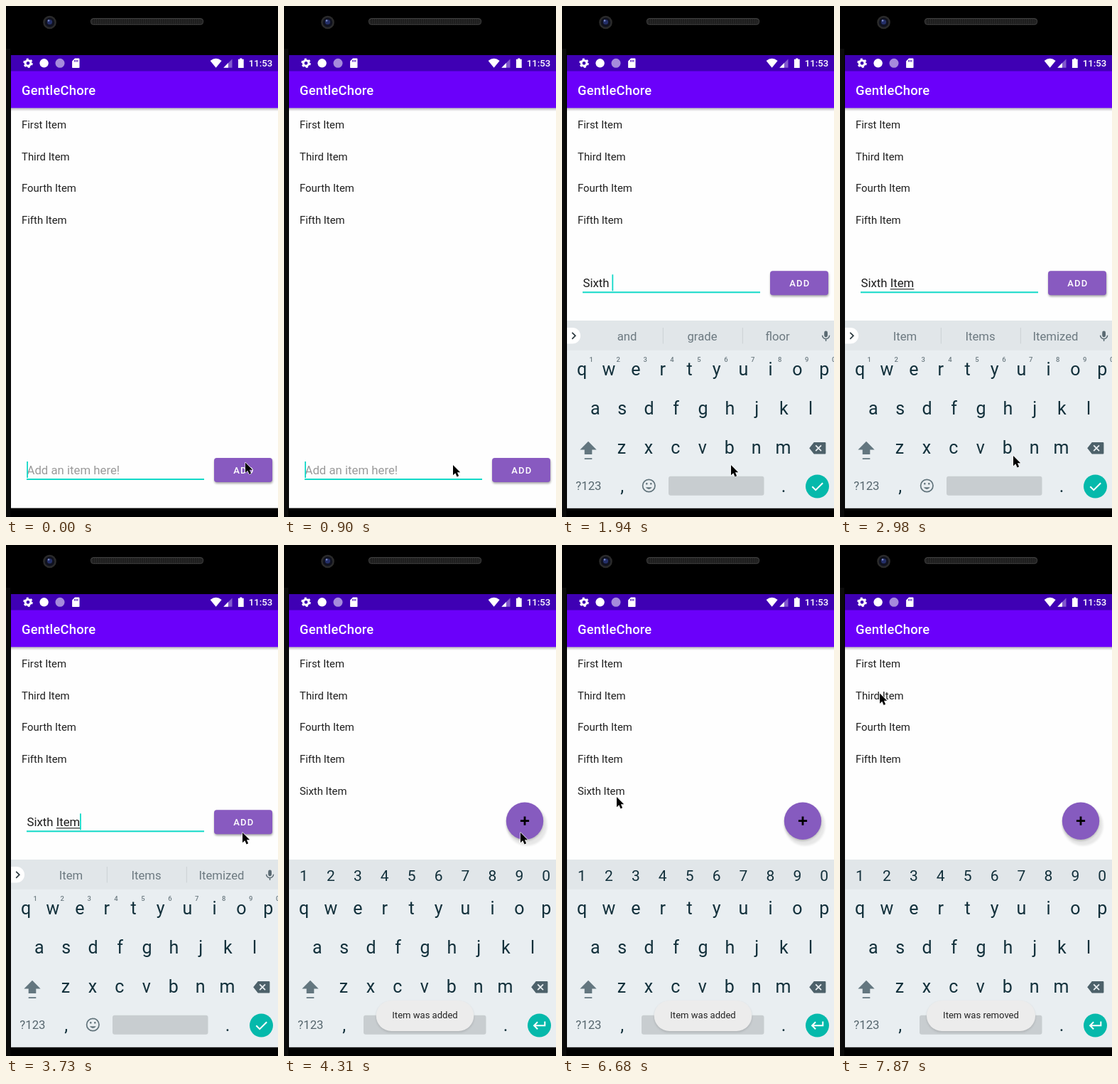
An HTML page for the animation above (8 s loop, 383 by 718 pixels).

```html
<!DOCTYPE html>
<html lang="en">
<head>
<meta charset="utf-8">
<title>Todo list</title>
<style>
  html, body { margin: 0; width: 100%; height: 100%; overflow: hidden; background: #000; }
  svg { display: block; width: 383px; height: 718px; font-family: Roboto, "Open Sans", sans-serif; }
  text { white-space: pre; }
  .mid { text-anchor: middle; }
  .item { font-size: 14.9px; fill: #1f1f1f; }
  .field { font-size: 16.75px; fill: #1c1c1c; }
  .hint { font-size: 16.75px; fill: #9a9a9a; }
  .key { font-size: 25px; fill: #12303b; }
  .num { font-size: 21px; fill: #12303b; }
  .sup { font-size: 9.5px; font-weight: 500; fill: #6d7b82; }
  .word { font-size: 16.7px; fill: #6c7980; }
  .toast { font-size: 13.05px; fill: #222; }
</style>
</head>
<body>
<svg viewBox="0 0 383 718">
  <defs>
    <pattern id="mesh" width="3" height="3" patternUnits="userSpaceOnUse">
      <rect width="3" height="3" fill="#1c1c1c"/><circle cx="1.5" cy="1.5" r=".8" fill="#383838"/>
    </pattern>
    <linearGradient id="barShade" x2="0" y2="1">
      <stop stop-color="#000" stop-opacity=".28"/><stop offset="1" stop-color="#000" stop-opacity="0"/>
    </linearGradient>
    <filter id="soft" x="-20%" y="-30%" width="140%" height="170%"><feGaussianBlur stdDeviation="1.4"/></filter>
  </defs>

  <!-- phone -->
  <rect width="383" height="718"/>
  <rect y="60" width="6" height="658" fill="#0b0b0b"/>
  <circle cx="61.5" cy="23" r="9.3" fill="#2b2b2b"/>
  <circle cx="61.5" cy="23" r="6.8" fill="#10121f"/>
  <circle cx="61.5" cy="22.5" r="3.6" fill="#242f68"/>
  <circle cx="60" cy="20.5" r="1.3" fill="#7f8dc8"/>
  <rect x="119.5" y="17.5" width="158" height="8.5" rx="3.5" fill="url(#mesh)" stroke="#444"/>

  <!-- screen -->
  <rect x="7" y="69" width="376" height="636.5" fill="#fefefe"/>
  <rect x="7" y="143" width="376" height="5" fill="url(#barShade)"/>
  <rect x="7" y="91" width="376" height="52.3" fill="#6b00fa"/>
  <rect x="7" y="69" width="376" height="22.5" fill="#3f00b4"/>
  <g fill="#fff">
    <circle cx="31" cy="80.3" r="3.9" fill="none" stroke="#fff" stroke-width="3"/>
    <circle cx="31" cy="80.3" r="5.7" fill="none" stroke="#fff" stroke-width="2.2" stroke-dasharray="2.9 3.07"/>
    <circle cx="53.6" cy="80.3" r="6.2"/>
    <circle cx="76" cy="80.3" r="6.5" fill="#a68bdc"/>
    <path d="M97 73.5h5.3a1.2 1.2 0 0 1 1.2 1.2v11.2a1.2 1.2 0 0 1-1.2 1.2h-8a1.2 1.2 0 0 1-1.2-1.2v-8.4z"/>
    <path d="M96.6 76v2.4m2.1-2.4v2.4m2.1-2.4v2.4" stroke="#3f00b4" stroke-width="1.1"/>
    <path d="M287.6 77q8-6.6 16 0l-8 9.8z"/>
    <path d="M306.3 86.7h12.2V74.4z" opacity=".35"/>
    <path d="M306.3 86.7h6.6v-6.6z"/>
    <path d="M329.3 73.4h3v1.4h2.4v12.1h-7.8V74.8h2.4z"/>
    <text x="341.7" y="85" font-size="13.2" font-weight="500">11:53</text>
    <text x="22" y="124.6" font-size="18.4" font-weight="500" letter-spacing=".2">GentleChore</text>
  </g>
  <g id="list"></g>

  <g id="form">
    <text id="hint" class="hint" x="29.5" y="658">Add an item here!</text>
    <text class="field" x="29.5" y="658"><tspan id="done"></tspan><tspan id="typing"></tspan></text>
    <rect id="under" y="660" height="1.1" fill="#1c1c1c"/>
    <rect x="29" y="664" width="250" height="2" fill="#12d9c8"/>
    <rect id="caret" y="640" width="1.8" height="23" fill="#12d9c8"/>
    <rect x="293.5" y="637" width="82" height="34" rx="4" fill="#000" opacity=".35" filter="url(#soft)"/>
    <rect x="293" y="635" width="82" height="34" rx="3.8" fill="#885ac0"/>
    <text class="mid" x="334.8" y="657" font-size="13" font-weight="500" letter-spacing="1.16" fill="#fff">ADD</text>
  </g>

  <g id="fab">
    <circle cx="342" cy="394" r="28.5" fill="#000" opacity=".09" filter="url(#soft)"/>
    <circle cx="339" cy="389.5" r="26.3" fill="#000" opacity=".2" filter="url(#soft)"/>
    <circle cx="339" cy="387.7" r="26.2" fill="#865bbf"/>
    <path d="M332.9 387.7h12.2m-6.1-6.1v12.2" stroke="#000" stroke-width="2.8"/>
  </g>

  <g id="board">
    <rect x="7" y="442" width="376" height="263.5" fill="#e9eef1"/>
    <rect x="7" y="442" width="376" height="41.7" fill="#e1e6e9"/>
    <g id="letters"></g>
    <g id="words">
      <path d="M7 452H14.7a11.3 11.3 0 0 1 0 22.6H7z" fill="#fff"/>
      <path d="M14.2 458.8l4.6 4.5-4.6 4.5" fill="none" stroke="#2c3a40" stroke-width="1.7"/>
      <path d="M142.3 452v22.5M254.3 452v22.5" stroke="#cbd1d4"/>
      <rect x="369.2" y="456.5" width="4.8" height="9" rx="2.4" fill="#5a6a72"/>
      <path d="M366.6 462.7a5 5 0 0 0 10 0M371.6 467.5v3.4" fill="none" stroke="#5a6a72" stroke-width="1.5"/>
      <g id="picks"></g>
      <g id="sups"></g>
      <g fill="none" stroke="#61737b" stroke-width="1.7">
        <circle cx="122.3" cy="674" r="8.7"/><path d="M117.8 676.3q4.5 5.6 9 0z" fill="#61737b" stroke="none"/>
        <path d="M119.3 670v2.6m6-2.6v2.6" stroke-width="2.2"/>
      </g>
    </g>
    <g id="nums"></g>
    <path d="M37 611.8l11.6 11.8h-6.3v6.4H31.7v-6.4h-6.3zM31.7 635.3h10.6v1.8H31.7z" fill="#63767f"/>
    <path d="M354.8 613h15.4a1.2 1.2 0 0 1 1.2 1.2v14a1.2 1.2 0 0 1-1.2 1.2h-15.4l-6.6-8.2z" fill="#4d616a"/>
    <path d="M357.2 617.3l7.8 7.8m0-7.8l-7.8 7.8" stroke="#e9eef1" stroke-width="1.8"/>
    <text class="mid" x="37.4" y="680" font-size="16.8" fill="#56666e">?123</text>
    <text class="mid key" x="84.8" y="683" font-size="23">,</text>
    <text class="mid key" x="312" y="683">.</text>
    <rect id="space" y="660.7" height="27" rx="3" fill="#c8cdd0"/>
    <circle cx="359.5" cy="675" r="16.5" fill="#05b9ab"/>
    <path id="enter" fill="none" stroke="#fff" stroke-width="2"/>
  </g>

  <g id="toast">
    <rect id="pillShade" y="641.5" height="43" rx="21" fill="#000" opacity=".12" filter="url(#soft)"/>
    <rect id="pill" y="640" height="43" rx="21.5" fill="#ececec"/>
    <text id="note" class="mid toast" x="198.5" y="665"></text>
  </g>

  <path id="mouse" d="M0 0V14.2L3.3 11.2 5.6 16.4 8.1 15.3 5.9 10.2H10.2Z" stroke="#fff" stroke-width="1.1" stroke-linejoin="round" paint-order="stroke"/>
</svg>

<script>
const $ = id => document.getElementById(id);
const LOOP = 8000, PITCH = 37.92;

const label = (cls, x, y, s) => `<text class="${cls}" x="${x}" y="${y}">${s}</text>`;
const row = (chars, cls, x, y) =>
  [...chars].map((c, i) => label('mid ' + cls, x + i * PITCH, y, c)).join('');

$('letters').innerHTML = row('qwertyuiop', 'key', 28, 519) +
  row('asdfghjkl', 'key', 46.8, 574) + row('zxcvbnm', 'key', 84, 629);
$('nums').innerHTML = row('1234567890', 'num', 28, 471.5);
$('sups').innerHTML = row('1234567890', 'sup', 41.3, 500);

const LIST = ['First', 'Third', 'Fourth', 'Fifth', 'Sixth'];
const MODES = {
  none: { board: 0, form: 0 },
  words: { board: 1, form: -262.7, space: [150, 134.5], enter: 'M352.3 675.3l4.9 4.9 10-10' },
  nums: { board: 1, space: [112, 172.5], enter: 'M367.3 669.5v5.7h-15m4.8-5l-5 5 5 5' }
};

// [ms, changes that last until overwritten]
const STEPS = [
  [0, { mode: 'none', at: [337, 641.5], caret: 1, done: '', typing: '', picks: [], count: 4, note: '', fade: 0, drop: 0 }],
  [150, { at: [296, 643] }],
  [300, { at: [252, 645] }],
  [450, { at: [238, 645], caret: 0 }],
  [900, { caret: 1 }],
  [1200, { mode: 'words', drop: 3, typing: 'Si', picks: ['Si', 'So', 'Since'] }],
  [1350, { drop: 0, typing: 'Six', picks: ['Six', 'Sixth', 'Sixty'] }],
  [1640, { typing: 'Sixt', picks: ['Sixt', 'Sixth', 'Sixty'] }],
  [1790, { typing: 'Sixth', picks: ['Sixth', 'Sixths', 'Sixty'] }],
  [1940, { done: 'Sixth ', typing: '', picks: ['and', 'grade', 'floor'] }],
  [2240, { typing: 'I', picks: ['I', 'I\'m', 'It'] }],
  [2390, { typing: 'Ite', picks: ['Ite', 'Item', 'Items'] }],
  [2530, { typing: 'Item', picks: ['Item', 'Items', 'Itemized'] }],
  [2980, { at: [244, 632], caret: 0 }],
  [3130, { at: [276, 560] }],
  [3280, { at: [320, 468] }],
  [3430, { at: [347, 412], caret: 1 }],
  [3580, { at: [338, 405] }],
  [3730, { at: [333, 404] }],
  [4020, { mode: 'nums', count: 5 }],
  [4170, { note: 'Item was added', fade: .5 }],
  [4310, { fade: 1 }],
  [4460, { at: [322, 406] }],
  [4600, { at: [276, 411] }],
  [4750, { at: [237, 414] }],
  [5490, { at: [101, 376] }],
  [5640, { at: [88, 364] }],
  [5790, { at: [80, 357] }],
  [5930, { at: [77, 355] }],
  [6680, { at: [77, 354] }],
  [7280, { count: 4, note: 'Item was removed' }],
  [7430, { at: [75, 333] }],
  [7580, { at: [67, 275] }],
  [7720, { at: [59, 222] }],
  [7870, { at: [56, 208.5] }]
];

const show = (id, on) => $(id).style.display = on ? '' : 'none';
const span = (id, x, w) => { $(id).setAttribute('x', x); $(id).setAttribute('width', w); };

function draw(s) {
  const m = MODES[s.mode], nums = s.mode === 'nums';
  $('list').innerHTML = LIST.slice(0, s.count)
    .map((n, i) => label('item', 22, 172 + i * 44.65, n + ' Item')).join('');

  show('form', !nums);
  show('fab', nums);
  show('board', m.board);
  show('words', !nums);
  show('nums', nums);

  if (!nums) {
    $('form').setAttribute('transform', `translate(0 ${m.form})`);
    $('done').textContent = s.done;
    $('typing').textContent = s.typing;
    show('hint', !(s.done + s.typing));
    const a = s.done ? $('done').getComputedTextLength() : 0;
    const b = s.typing ? $('typing').getComputedTextLength() : 0;
    span('under', 29.5 + a, b);
    $('caret').setAttribute('x', 29.2 + a + b);
    show('caret', s.caret);
    $('picks').innerHTML = s.picks.map((w, i) => label('mid word', 91.5 + i * 106, 469.5, w)).join('');
  }
  if (m.board) {
    $('board').setAttribute('transform', `translate(0 ${s.drop})`);
    $('board').setAttribute('opacity', s.drop ? .86 : 1);
    span('space', ...m.space);
    $('enter').setAttribute('d', m.enter);
  }

  $('toast').setAttribute('opacity', s.fade);
  $('note').textContent = s.note;
  const w = s.note.endsWith('removed') ? 153 : 137.5;
  span('pill', 198.5 - w / 2, w);
  span('pillShade', 198.5 - w / 2, w);
  $('mouse').setAttribute('transform', `translate(${s.at})`);
}

let last = -1;
function tick() {
  const t = performance.now() % LOOP;
  const n = STEPS.filter(([ms]) => ms <= t).length;
  if (n !== last) {
    last = n;
    draw(Object.assign({}, ...STEPS.slice(0, n).map(([, change]) => change)));
  }
  requestAnimationFrame(tick);
}
tick();
</script>
</body>
</html>
```
